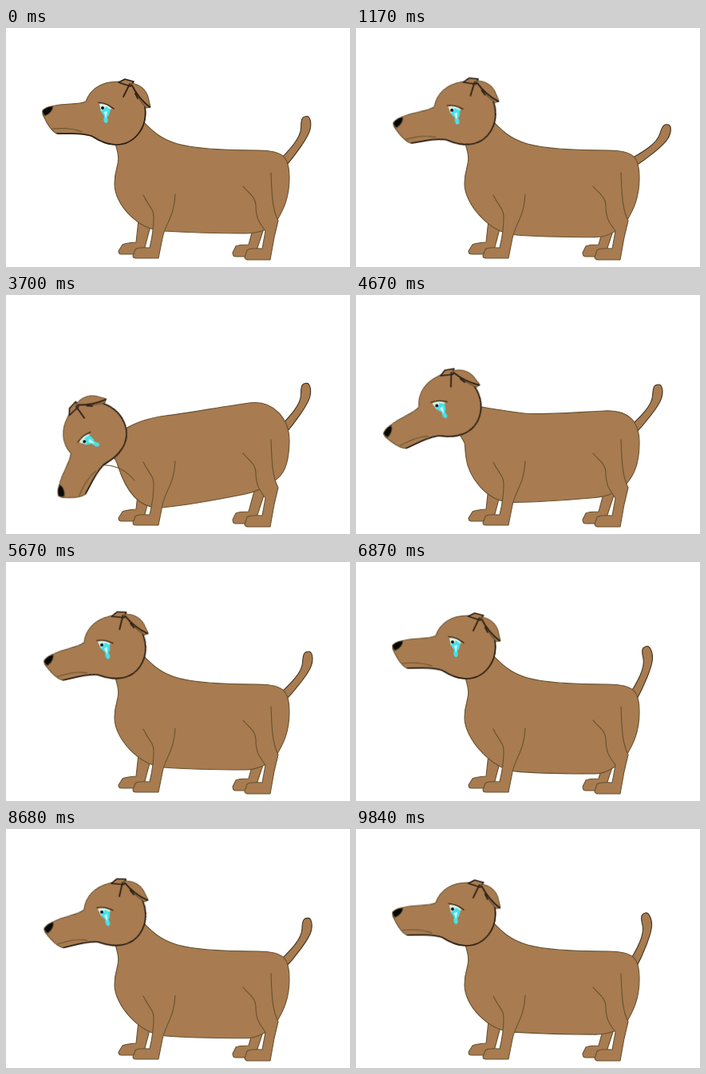
An HTML page without scripts for the animation above (9870 ms loop, 431x299 px).

```html
<!DOCTYPE html>
<html lang="en">
<head>
<meta charset="utf-8">
<title>Sad dog</title>
<style>
@property --t { syntax: "<number>"; inherits: true; initial-value: 0; }

html, body { margin: 0; width: 100%; height: 100%; overflow: hidden; background: #fff; }
svg { display: block; width: 100%; height: 100%; animation: clock 9870ms linear infinite; }
path { fill: #a87b50; stroke: #66522f; stroke-width: 1.1; stroke-linecap: round; stroke-linejoin: round; }
.line { fill: none; }
.dark { stroke: #2c2016; stroke-width: 1.7; }
.torso, .head, .throat { animation: 9870ms linear infinite; }

/* seconds since the loop began */
@keyframes clock { to { --t: 9.87; } }

/* triangle wave, one wag per second */
.tail {
  transform-origin: 347px 167px;
  transform: rotate(calc(29deg - acos(cos((var(--t) - .35) * 360deg)) * .267));
}

/* slow breathing, with a stoop in the middle */
.torso { animation-name: breathe; }
@keyframes breathe {
  0%, 50%, 100% { d: path("M165 110 C180 125 190 138 215 145 S280 153 315 153 S355 163 355 188 S347 228 340 240 S315 257 300 257 S230 256 197 254 S136 220 136 195 S146 173 137 145 Z"); }
  25%, 28%, 75% { d: path("M165 110 C180 125 190 138 215 145 S280 153 315 153 S355 163 355 188 S347 228 340 240 S315 267 300 267 S230 268 200 264 S136 220 136 195 S146 173 137 145 Z"); }
  36%, 44% { d: path("M140 175 C150 163 180 153 200 151 S275 139 305 135 S356 155 355 185 S347 225 337 232 S315 246 300 249 S230 263 195 266 S146 232 140 213 S130 210 122 213 Z"); }
}

.head { transform-origin: 137px 106px; animation-name: nod; }
@keyframes nod {
  0%, 28%, 50%, 70%, 100% { transform: none; }
  17%, 54%, 86% { transform: rotate(-14deg); animation-timing-function: ease-in; }
  36%, 44% { transform: translate(-26px, 66px) rotate(-62deg); }
  47% { transform: translate(-21px, 35px) rotate(-28deg); }
}

.throat { opacity: 0; animation-name: crease; }
@keyframes crease {
  33%, 46% { opacity: 0; }
  36%, 44% { opacity: 1; }
}
</style>
</head>
<body>
<svg viewBox="0 0 431 299">
  <path class="tail" style="stroke:#40331d" d="M337 170 C358 152 372 139 373 126 S377 113 381 113 S387 121 384 130 S364 160 346 177"/>

  <g class="far-legs">
    <path d="M166 240 L163 268 Q150 269 146 271 L141 279 Q141 283 145 283 H162 L174 274 L181 248"/>
    <path d="M313 238 L304 271 Q291 271 288 273 L284 281 Q284 286 288 286 H302 L315 275 L324 248"/>
  </g>

  <path class="torso"/>
  <path class="line throat" d="M124 213 Q145 213 161 232"/>

  <g class="near-legs">
    <path d="M172 209 C178 222 186 227 185 238 Q185 254 180 275 Q165 274 162 277 L159 285 Q159 288 163 288 H191 L196 263 C199 246 211 236 212 208"/>
    <path d="M297 198 C303 206 313 211 313 222 C313 240 319 245 325 254 L321 276 Q306 275 302 278 L299 287 Q300 290 304 290 H331 L336 262 L341 241 C333 226 333 204 332 181"/>
  </g>

  <g class="head">
    <path d="M100 92 C106 75 121 67 140 67 S175 84 175 106 S158 146 138 146 S118 138 107 135 C92 130 80 133 64 132 Q56 130 46 108 Q45 102 57 98 C74 93 90 97 100 92 Z"/>
    <path class="line dark" d="M174 98 C178 126 160 146 138 146 Q124 146 107 135 C92 130 80 133 64 132"/>
    <path style="fill:#080808" d="M46 103 Q51 98 59 98 Q58 106 49 110 Q45 107 46 103 Z"/>
    <path class="line" d="M58 126 C70 125 84 125 95 130"/>

    <path class="dark" d="M141 68 L149 64 L160 67 L156 73 Z"/>
    <path d="M157 69 C166 70 175 76 178 86 L181 99 L176 100 Q164 88 157 69 Z"/>
    <path class="line dark" d="M155 70 L147 86 M158 72 Q166 88 180 99 M162 82 L165 88"/>

    <path style="fill:#d5f7f0;stroke:none" d="M117 95 Q126 94 132 101 L127 105 L119 104 Z"/>
    <path style="fill:#45e2ea;stroke:none" d="M118 103 Q123 103 125 98 L131 102 L129 109 L127 111 Q129 119 125 119 Q121 118 123 110 Z"/>
    <path style="fill:#d8ffff;stroke:none" d="M123 105 L127 104 L125 113 Z"/>
    <circle cx="121" cy="100" r="2" fill="#111"/>
    <path class="line dark" style="stroke-width:1.2" d="M116 93 Q127 94 135 101"/>
  </g>
</svg>
</body>
</html>
```
